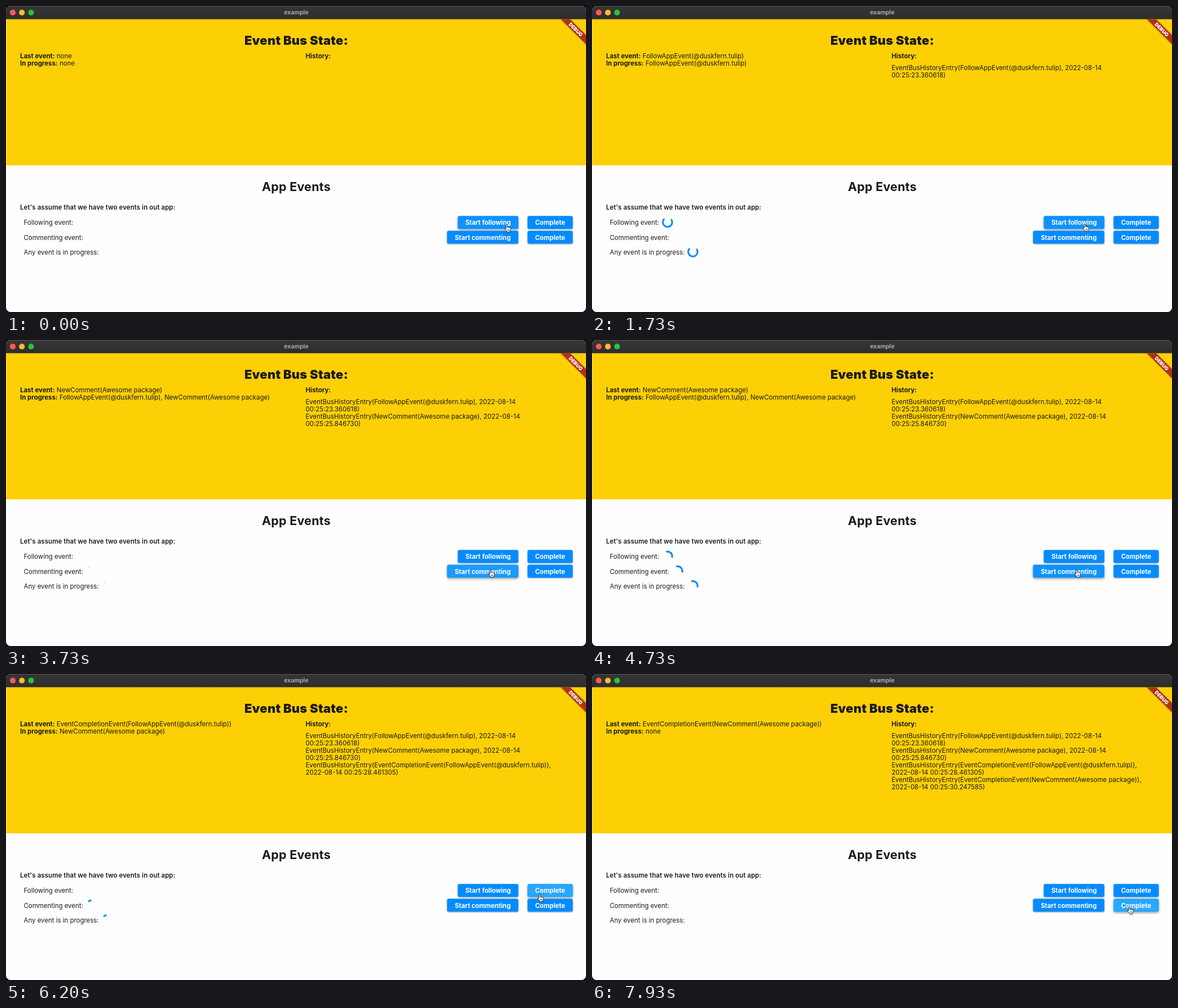
An HTML page that plays this animation: 1029 by 544 pixels, repeating every 8000 ms.

```html
<!DOCTYPE html>
<html lang="en">
<head>
<meta charset="utf-8">
<title>example</title>
<style>
  html, body { margin: 0; height: 100%; overflow: hidden; background: #000; }
  svg { display: block; width: 1029px; height: 544px; border-radius: 8px; }
  text { font: 400 11.44px Inter, sans-serif; fill: #1b1a17; }
  .b { font-weight: 700; }
  .mid { text-anchor: middle; }
  .button text { font-size: 11.3px; font-weight: 700; fill: #fff; }
  .spinner { fill: none; stroke: #0f8bfb; stroke-width: 3.2; }
</style>
</head>
<body>
<svg id="stage" viewBox="0 0 1029 544">
  <defs>
    <linearGradient id="bar" x2="0" y2="1">
      <stop stop-color="#363636"/><stop offset="1" stop-color="#2d2d2d"/>
    </linearGradient>
    <clipPath id="content"><path d="M0 23.5H1029V544H0z"/></clipPath>
  </defs>
  <rect width="1029" height="544" fill="#fefefe"/>
  <rect y="23" width="1029" height="260.3" fill="#fdd006"/>
  <rect y="23" width="1" height="260.3" fill="#fff" opacity=".3"/>
  <rect width="1029" height="23.5" fill="url(#bar)"/>
  <rect width="1029" height="1" fill="#555"/>
  <circle cx="12" cy="11.7" r="5.1" fill="#fc5b55"/>
  <circle cx="28.2" cy="11.7" r="5.1" fill="#fdbb2d"/>
  <circle cx="44.5" cy="11.7" r="5.1" fill="#27c33f"/>
  <text class="mid" x="515" y="15" style="font-size:10.6px;font-weight:600;fill:#b5b5b5">example</text>

  <g clip-path="url(#content)">
    <g transform="translate(1029 23.5) rotate(45)">
      <rect x="-40" y="20" width="80" height="11.5" fill="#b03018" style="filter:drop-shadow(0 0 1px #0006)"/>
      <text class="mid" y="29" style="font-size:8.8px;font-weight:900;fill:#fff">DEBUG</text>
    </g>
  </g>

  <text class="mid" x="515" y="68.5" style="font-size:22px;font-weight:900;letter-spacing:.2px">Event Bus State:</text>
  <text x="25" y="93"><tspan class="b">Last event:</tspan> <tspan id="last"></tspan></text>
  <text x="25" y="106"><tspan class="b">In progress:</tspan> <tspan id="active"></tspan></text>
  <text class="b" x="531.5" y="93">History:</text>
  <g id="history"></g>

  <text class="mid" x="515" y="328.5" style="font-size:21.5px;font-weight:700;letter-spacing:.2px">App Events</text>
  <text x="25" y="361.5" style="font-weight:600;letter-spacing:.09px">Let's assume that we have two events in out app:</text>
  <text x="31.5" y="389">Following event:</text>
  <text x="31.5" y="415.5">Commenting event:</text>
  <text x="31.5" y="442">Any event is in progress:</text>
  <g id="spinners"></g>
  <g id="buttons"></g>
  <path id="hand" fill="#fff" stroke="#222" stroke-linejoin="round"
    d="M-1.3 1.2Q-1.3 0 0 0T1.2 1.2V5Q2.6 4.2 3.4 5.3Q4.9 4.6 5.5 5.9Q7 5.5 7 7.2Q7 10 5.6 11.5V13.3H0V11.9Q-2.5 9.5-4 7.2Q-3.4 5.8-1.3 7.4ZM1.8 8.5V11M3.8 8.5V11"/>
</svg>
<script>
const LOOP = 8000;
const BUTTON_H = 23;
const $ = id => document.getElementById(id);

function add(parent, tag, attrs, text = '') {
  const el = document.createElementNS('http://www.w3.org/2000/svg', tag);
  for (const key in attrs) el.setAttribute(key, attrs[key]);
  el.textContent = text;
  return parent.appendChild(el);
}

const follow = 'FollowAppEvent(@duskfern.tulip)';
const comment = 'NewComment(Awesome package)';
const done = event => `EventCompletionEvent(${event})`;

// Each step: when it fires, the event, what is then in progress, its time stamp
const steps = [
  { at: 0, event: 'none', active: [] },
  { at: 860, event: follow, active: [follow], stamp: '00:25:23.360618' },
  { at: 3330, event: comment, active: [follow, comment], stamp: '00:25:25.846730' },
  { at: 5930, event: done(follow), active: [comment], stamp: '00:25:28.461305' },
  { at: 7730, event: done(comment), active: [], stamp: '00:25:30.247585' },
];

const entries = steps.slice(1).map(({ at, event, stamp }, i) => {
  const g = add($('history'), 'g', {});
  const breakEarly = event.startsWith('EventCompletion');
  const day = '2022-08-14';
  const y = 114 + i * 26.1;
  add(g, 'text', { x: 531.5, y }, `EventBusHistoryEntry(${event},${breakEarly ? '' : ' ' + day}`);
  add(g, 'text', { x: 531.5, y: y + 13 }, `${breakEarly ? day + ' ' : ''}${stamp})`);
  return { g, at };
});

const spinners = [
  [134, 384.4, active => active.includes(follow)],
  [152, 410.7, active => active.includes(comment)],
  [179, 437, active => active.length > 0],
].map(([x, y, shown]) => ({
  x, y, shown, el: add($('spinners'), 'circle', { class: 'spinner', r: 8.3, pathLength: 360 }),
}));

const buttons = [
  ['Start following', 801.5, 373.2, 107.5, 860],
  ['Start commenting', 782.5, 399.5, 126.5, 3330],
  ['Complete', 925.3, 373.2, 80.2, 5930],
  ['Complete', 925.3, 399.5, 80.2, 7730],
].map(([label, x, y, w, click]) => {
  const g = add($('buttons'), 'g', { class: 'button' });
  const box = { x, y, width: w, height: BUTTON_H, rx: 3 };
  const base = add(g, 'rect', { ...box, fill: '#058bff' });
  const glow = add(g, 'rect', { ...box, fill: '#5cd0ff' });
  add(g, 'text', { class: 'mid', x: x + w / 2, y: y + 16 }, label);
  return { x, y, w, click, base, glow };
});

// Pointer tip: time, x, y
const path = [
  [0, 888.5, 388.5], [1000, 888.5, 388.5], [1700, 874.5, 387.5], [2100, 874.5, 387.5],
  [2800, 859.5, 408.5], [4760, 860, 408.5], [5500, 946.5, 389.5], [6060, 946.5, 389.5],
  [6700, 949.5, 405.5], [7000, 949.5, 405.5], [7500, 953.5, 413.5], [LOOP, 953.5, 413.5],
];

const clamp = x => Math.min(1, Math.max(0, x));
const fract = x => x - Math.floor(x);

function pointer(t) {
  const i = path.findIndex(p => p[0] > t);
  const [t0, x0, y0] = path[i - 1], [t1, x1, y1] = path[i];
  const u = (t - t0) / (t1 - t0), k = u * u * (3 - 2 * u);
  return [x0 + (x1 - x0) * k, y0 + (y1 - y0) * k];
}

// cubic-bezier(.4, 0, .2, 1)
function ease(x) {
  let lo = 0, hi = 1;
  for (let i = 0; i < 20; i++) {
    const s = (lo + hi) / 2;
    if (1.2 * s * (1 - s) ** 2 + 0.6 * s * s * (1 - s) + s ** 3 < x) lo = s; else hi = s;
  }
  return lo * lo * (3 - 2 * lo);
}

function draw(t) {
  const step = steps.findLast(s => s.at <= t);
  $('last').textContent = step.event;
  $('active').textContent = step.active.join(', ') || 'none';
  for (const { g, at } of entries) g.style.visibility = t >= at ? 'visible' : 'hidden';

  const phase = fract((t - 1730) / 1333 + 0.43);
  const head = ease(clamp(phase * 2)) * 270;
  const tail = ease(clamp(phase * 2 - 1)) * 270;
  const turn = (t - 1730) / 2222 * 360 + 11;
  const start = -90 + tail + turn + phase * 90;
  for (const { x, y, shown, el } of spinners) {
    el.style.visibility = shown(step.active) ? 'visible' : 'hidden';
    el.setAttribute('transform', `translate(${x} ${y}) rotate(${start})`);
    el.setAttribute('stroke-dasharray', `${Math.max(head - tail, 0.1)} 360`);
  }

  const [px, py] = pointer(t);
  $('hand').setAttribute('transform', `translate(${px} ${py})`);
  for (const { x, y, w, click, base, glow } of buttons) {
    const hover = px > x && px < x + w && py > y && py < y + BUTTON_H;
    const since = t - click;
    const press = clamp((since + 120) / 120) * clamp((500 - since) / 250);
    glow.setAttribute('opacity', (hover ? 0.1 : 0) + press * 0.32);
    base.style.filter = `drop-shadow(0 ${hover ? '2px 2px' : '1px 1px'} #0006)`;
  }
}

function tick(now) {
  draw(now % LOOP);
  requestAnimationFrame(tick);
}
draw(0);
requestAnimationFrame(tick);
</script>
</body>
</html>
```
